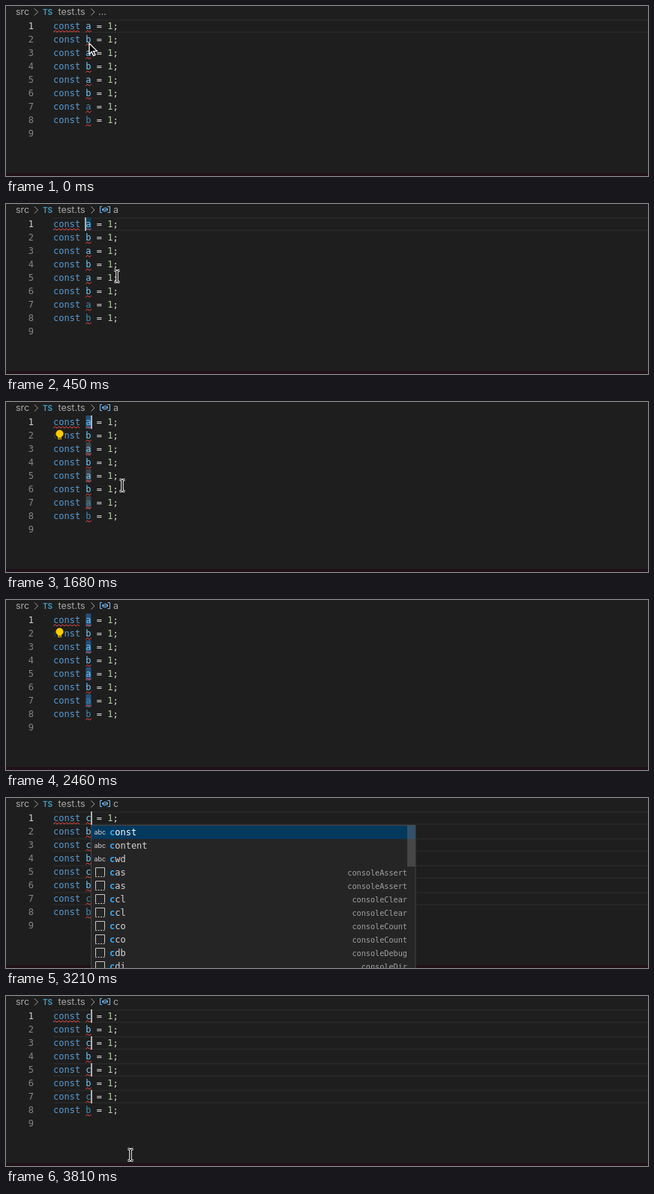
Animation of 856 by 228 pixels, one loop 4050 ms. Source, as an HTML page with a canvas:

```html
<!DOCTYPE html>
<html lang="en">
<head>
<meta charset="utf-8">
<title>Multi-cursor editing</title>
<style>
  html, body { margin: 0; overflow: hidden; background: #1e1e1e; }
  canvas { display: block; }
</style>
</head>
<body>
<canvas id="stage" width="856" height="228"></canvas>
<script>
const ctx = document.getElementById('stage').getContext('2d');
const LOOP = 4050, STEP = 30, ROW = 18, TOP = 18, LEFT = 63, CHAR = 7.22;
const MONO = '"DejaVu Sans Mono", monospace', SANS = 'Inter, sans-serif';
const NAME_X = LEFT + 6 * CHAR;
const TWINS = [0, 2, 4, 6];

// Moments of the story, in ms
const CLICK = 180, RELEASE = 300, SYMBOL = 390, SELECT = 1440, SELECT_ALL = 1950,
      TYPE = 2820, POPUP = 2970, CRUMB = 3120, CLOSE = 3270;
const CARET_ON = [[CLICK, 660], [1110, 1920], [SELECT_ALL, 2430], [TYPE, 3330], [3810, LOOP]];

const TRIPS = [
  [[0, 111, 50], [CLICK, 107, 28], [RELEASE, 107, 28], [450, 148, 97],
   [1650, 148, 97], [1680, 155, 112], [1860, 190, 188], [SELECT_ALL, 190, 188]],
  [[3510, 103, 226], [3810, 166, 213], [LOOP, 166, 213]]
];

const SUGGESTIONS = [
  ['const'], ['content'], ['cwd'],
  ['cas', 'Assert'], ['cas', 'Assert'], ['ccl', 'Clear'], ['ccl', 'Clear'],
  ['cco', 'Count'], ['cco', 'Count'], ['cdb', 'Debug'], ['cdi', 'Dir']
];

const within = (t, a, b) => t >= a && t < b;

function rect(x, y, w, h, color) {
  ctx.fillStyle = color;
  ctx.fillRect(x, y, w, h);
}

function text(str, x, y, color, font = `12px ${MONO}`, align = 'left') {
  ctx.font = font;
  ctx.fillStyle = color;
  ctx.textAlign = align;
  ctx.fillText(str, x, y);
}

function line(points, color, width = 1) {
  ctx.beginPath();
  points.forEach(([x, y]) => ctx.lineTo(x, y));
  ctx.strokeStyle = color;
  ctx.lineWidth = width;
  ctx.stroke();
}

function circle(x, y, r, fill, stroke) {
  ctx.beginPath();
  ctx.arc(x, y, r, 0, 7);
  if (fill) { ctx.fillStyle = fill; ctx.fill(); }
  if (stroke) { ctx.strokeStyle = stroke; ctx.lineWidth = 1; ctx.stroke(); }
}

function squiggle(x, y, width) {
  const points = [];
  for (let i = 0; i * 2.5 <= width + 1; i++) points.push([x + i * 2.5, y + (i % 2 ? -1 : 1)]);
  line(points, '#f14c4c');
}

function chevron(x) {
  line([[x, 3.5], [x + 4.5, 8], [x, 12.5]], '#a0a0a0');
}

function breadcrumb(t) {
  const font = `12.5px ${SANS}`, gray = '#a9a9a9';
  text('src', 13, 12, gray, font);
  chevron(38);
  text('TS', 49, 11.5, '#3f94bd', `bold 10px ${SANS}`);
  text('test.ts', 69.5, 12, gray, font);
  chevron(113.5);
  if (t < SYMBOL) return text('…', 123, 12, gray, font);
  const blue = '#75beff';
  line([[128, 3.5], [125.5, 3.5], [125.5, 11.5], [128, 11.5]], blue);
  line([[135.5, 3.5], [138.5, 3.5], [138.5, 11.5], [135.5, 11.5]], blue);
  line([[128.5, 7], [132.5, 5], [135.5, 6.5], [135.5, 8.5], [131.5, 10], [128.5, 8.5], [128.5, 7], [131.5, 8], [135.5, 6.5]], blue);
  text(t < CRUMB ? 'a' : 'c', 143, 12, gray, font);
}

function highlight(row, color) {
  ctx.beginPath();
  ctx.roundRect(NAME_X, TOP + row * ROW, CHAR, ROW, 2);
  ctx.fillStyle = color;
  ctx.fill();
}

function lineFrame(row) {
  const y = TOP + row * ROW;
  rect(LEFT, y, 800, 1.5, '#282828');
  rect(LEFT, y + ROW - 1.5, 800, 1.5, '#282828');
}

function backgrounds(t) {
  if (t < SELECT) lineFrame(0);
  if (t >= TYPE) return TWINS.forEach(lineFrame);
  if (within(t, SYMBOL, SELECT)) highlight(0, '#0d3d5a');
  if (t >= SELECT)
    TWINS.forEach(row => highlight(row, row === 0 || t >= SELECT_ALL ? '#264f78' : '#3d444a'));
}

function code(t) {
  for (let row = 0; row < 9; row++) {
    const y = 31 + row * ROW;
    text(row + 1, 37, y, row ? '#858585' : '#d0d0d0', undefined, 'right');
    if (row === 8) break;
    const name = row % 2 ? 'b' : t < TYPE ? 'a' : 'c';
    text('const', LEFT, y, '#569cd6');
    text(name, NAME_X, y, row < 6 ? '#6fcbff' : '#3f8ab4');
    text('=', LEFT + 8 * CHAR, y, '#d4d4d4');
    text('1', LEFT + 10 * CHAR, y, '#b5cea8');
    text(';', LEFT + 11 * CHAR, y, '#d4d4d4');
    squiggle(NAME_X, y + 3, CHAR);
  }
  squiggle(LEFT, 34, 5 * CHAR);
}

function carets(t) {
  if (!CARET_ON.some(([a, b]) => within(t, a, b))) return;
  const x = t < SELECT ? 105 : 113;
  (t < SELECT_ALL ? [0] : TWINS).forEach(row => rect(x, TOP + row * ROW, 2, ROW, '#aeafad'));
}

function bulb() {
  rect(64, 36, 14, ROW, 'rgba(30,30,30,.7)');
  rect(67, 37, 10, 16, '#1e1e1e');
  circle(71.5, 42.5, 5, '#ffcc00');
  rect(69, 46, 5, 4, '#ffcc00');
  rect(69.5, 48, 4, 1, '#1e1e1e');
}

function popup() {
  const x = 113.5, y = 36.5, right = 546;
  rect(x, y, right - x, 200, '#252526');
  rect(x + .5, y + .5, right - x - 1, ROW, '#04395e');
  SUGGESTIONS.forEach(([word, detail], i) => {
    const base = 50 + i * ROW;
    text('c', 138, base, '#2aaaff', `bold 12px ${MONO}`);
    text(word.slice(1), 138 + CHAR, base, i ? '#d4d4d4' : '#ffffff');
    if (!detail) return text('abc', 117.5, base - 1, '#d0d0d0', `9px ${SANS}`);
    text('console' + detail, 535, base, '#a0a0a0', `10.2px ${MONO}`, 'right');
    const top = base - 10.5;
    line([[119.5, top + 11], [119.5, top], [131.5, top], [131.5, top + 11]], '#c5c5c5');
    ctx.setLineDash([2, 1.5]);
    line([[119, top + 12], [132, top + 12]], '#c5c5c5');
    ctx.setLineDash([]);
  });
  rect(535, 37, 11, 55, 'rgba(121,121,121,.4)');
  ctx.strokeStyle = '#454545';
  ctx.lineWidth = 1;
  ctx.strokeRect(x, y, right - x, 200);
}

function arrow(x, y) {
  const shape = [[0, 0], [0, 14.5], [3.3, 11.4], [5.6, 16.6], [8, 15.6], [5.7, 10.6], [10.3, 10.4]];
  ctx.beginPath();
  shape.forEach(([dx, dy]) => ctx.lineTo(x + dx, y + dy));
  ctx.closePath();
  ctx.fillStyle = '#000';
  ctx.fill();
  ctx.strokeStyle = '#fff';
  ctx.lineWidth = 1.3;
  ctx.stroke();
}

function beam(x, y) {
  for (const [color, width] of [['#fff', 3], ['#000', 1]]) {
    line([[x - 3.5, y - 8], [x - 1, y - 7.5], [x, y - 6], [x, y + 6], [x - 1, y + 7.5], [x - 3.5, y + 8]], color, width);
    line([[x + 3.5, y - 8], [x + 1, y - 7.5], [x, y - 6], [x, y + 6], [x + 1, y + 7.5], [x + 3.5, y + 8]], color, width);
  }
}

function pointer(t) {
  const trip = TRIPS.find(p => within(t, p[0][0], p[p.length - 1][0]));
  if (!trip) return;
  const i = trip.findIndex(p => p[0] > t);
  const [t0, x0, y0] = trip[i - 1], [t1, x1, y1] = trip[i];
  const u = (t - t0) / (t1 - t0), k = u * u * (3 - 2 * u);
  const x = x0 + (x1 - x0) * k, y = y0 + (y1 - y0) * k;
  if (within(t, CLICK, RELEASE)) {
    circle(x, y, 16.5, 'rgba(0,0,0,.25)', '#e8e8e8');
    circle(x, y, 14, null, '#c8c8c8');
  }
  (t < 60 ? arrow : beam)(x, y);
}

function draw(now) {
  const t = Math.floor(now % LOOP / STEP) * STEP;
  rect(0, 0, 856, 228, '#1e1e1e');
  rect(0, 224, 856, 4, '#211018');
  breadcrumb(t);
  backgrounds(t);
  code(t);
  if (within(t, SELECT, TYPE)) bulb();
  carets(t);
  if (within(t, POPUP, CLOSE)) popup();
  pointer(t);
}

const start = performance.now();
function frame() {
  draw(performance.now() - start);
  requestAnimationFrame(frame);
}
frame();
</script>
</body>
</html>
```
